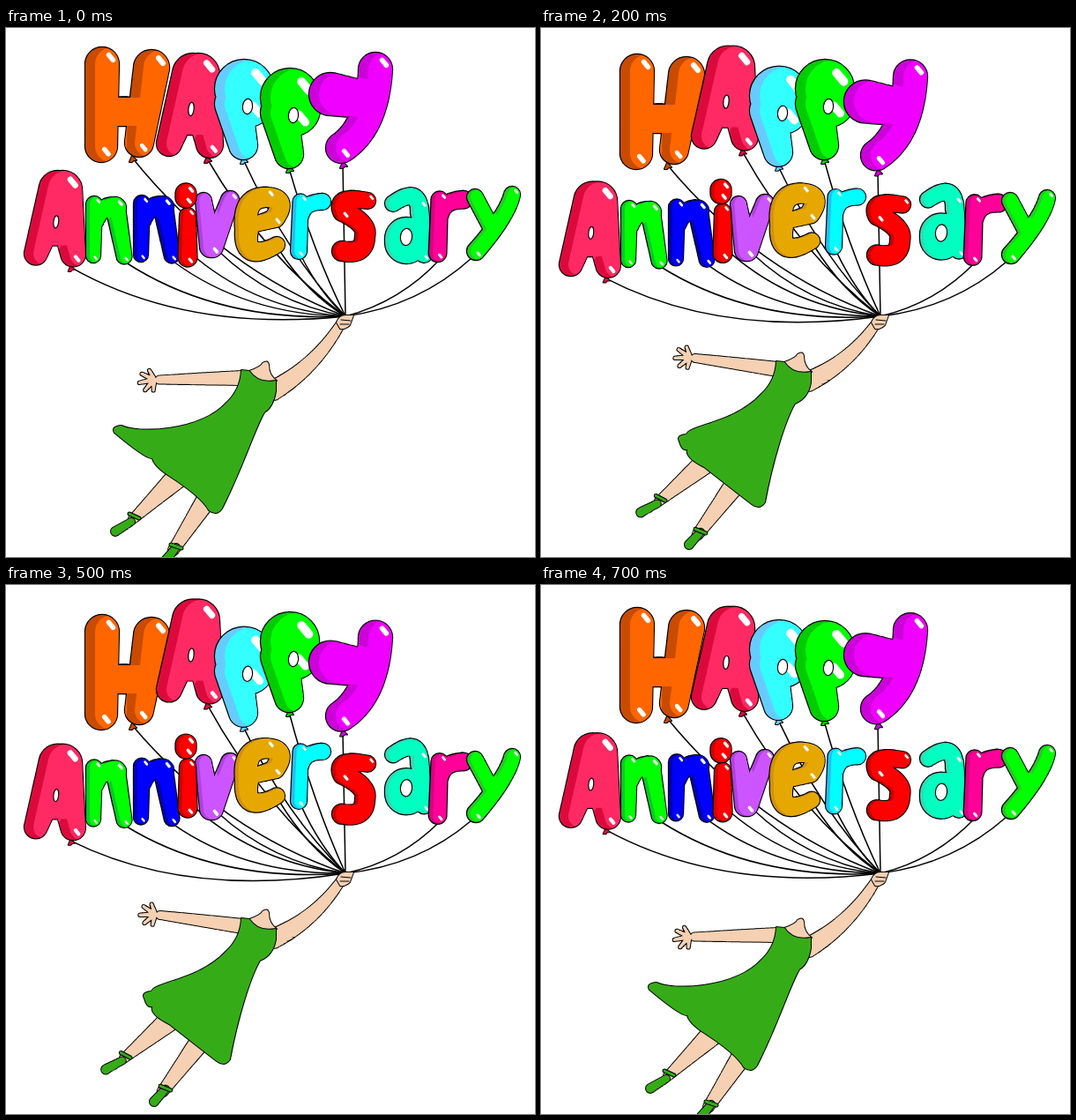
An HTML page with a canvas that plays this animation: 600 by 600 pixels, repeating every 800 ms.

```html
<!DOCTYPE html>
<html lang="en">
<head>
<meta charset="utf-8">
<title>Happy Anniversary</title>
<style>
html, body { margin: 0; width: 100%; height: 100%; overflow: hidden; background: #fff; }
canvas { display: block; width: 100vw; height: 100vh; }
</style>
</head>
<body>
<canvas id="stage" width="600" height="600" role="img" aria-label="Happy Anniversary"></canvas>
<script>
const ctx = document.getElementById('stage').getContext('2d');
const SKIN = '#f5d0b2', GREEN = '#36ab18';
const HAND = { x: 385, y: 327 };

// A limb is a tapering tube: x, y, [bend x, y,] x, y, start radius, end radius.
function tubes(limbs) {
  const path = new Path2D(), steps = 40;
  for (const limb of limbs) {
    const [r0, r1] = limb.slice(-2), [x0, y0] = limb, [x1, y1] = limb.slice(-4);
    const [cx, cy] = limb.length > 6 ? limb.slice(2) : [(x0 + x1) / 2, (y0 + y1) / 2];
    for (let i = 0; i <= steps; i++) {
      const t = i / steps, u = 1 - t, r = r0 + (r1 - r0) * t;
      const x = u * u * x0 + 2 * u * t * cx + t * t * x1;
      const y = u * u * y0 + 2 * u * t * cy + t * t * y1;
      path.moveTo(x + r, y);
      path.arc(x, y, r, 0, 7);
    }
  }
  return path;
}

// Letter skeletons; the first `lit` limbs carry shines, `tail` is where the string hangs.
const glyphs = {
  H: { limbs: [[20, 20, 19, 113, 19, 18], [76, 24, 62, 109, 20, 16], [22, 74, 62, 74, 16, 16]], lit: 2, tail: [54, 126] },
  A: { limbs: [[48, 25, 61, 104, 24, 15], [42, 24, 15, 103, 23, 14], [25, 78, 55, 78, 15, 15]], hole: [40, 64, 2.5, 7], tail: [58, 120] },
  P: { limbs: [[34, 33, 38, 46, 33, 30], [22, 50, 33, 97, 21, 16]], hole: [38, 53, 5, 8], tail: [33, 113] },
  Y: { limbs: [[75, 20, 72, 85, 36, 109, 19, 17], [24, 48, 60, 54, 24, 21]], tail: [38, 127] },
  n: { limbs: [[34, 13, 44, 69, 11, 8.5], [10, 10, 9, 68, 9, 8], [12, 30, 20, 8, 35, 14, 8, 11]], lit: 2, tail: [46, 76] },
  i: { limbs: [[11, 36, 11, 83, 9, 10.5]], tail: [21, 84] },
  dot: { limbs: [[9, 11, 9, 15, 11.5, 11.5]] },
  v: { limbs: [[40, 11, 20, 64, 10, 12], [10, 12, 18, 64, 9, 12]], tail: [26, 68] },
  e: { limbs: [[35, 12, 60, 13, 45, 35, 11, 11], [13, 48, 8, 12, 35, 12, 13, 11], [47, 66, 8, 88, 13, 48, 9, 13], [45, 36, 18, 44, 10, 8]], tail: [50, 72] },
  r: { limbs: [[9, 10, 7, 66, 8.5, 9], [10, 26, 14, 10, 34, 10, 8, 9]], tail: [10, 72] },
  s: { limbs: [[41, 14, 4, 8, 13, 26, 9, 11], [13, 26, 42, 40, 38, 54, 11, 11], [38, 54, 38, 76, 12, 71, 11, 11]] },
  a: { limbs: [[40, 24, 45, 77, 10, 9], [10, 19, 40, -2, 40, 30, 9, 10], [25, 59, 25, 63, 24, 24]], hole: [25, 57, 6, 9] },
  y: { limbs: [[52, 10, 46, 34, 11, 74, 9, 10], [10, 13, 27, 45, 9, 9]], tail: [6, 82] }
};

function letter(name, x, y, step, light, dark, scale = 1) {
  const glyph = glyphs[name];
  return { ...glyph, x, y, step, light, dark, scale, path: tubes(glyph.limbs), big: 'HAPY'.includes(name) };
}

// Name, left, top, rise or fall per step, colours.
const letters = [
  letter('H', 89, 21, 4, '#ff6600', '#c84b00'),
  letter('A', 170, 28, -4.2, '#ff2a63', '#dc0a3c'),
  letter('P', 236, 36, 3.9, '#33ffff', '#66ccff'),
  letter('P', 288, 46, -5, '#00ff00', '#00cc00'),
  letter('Y', 344, 27, 4.2, '#f000ff', '#cc00d9'),
  letter('n', 90, 190, 2.5, '#00ff00', '#00cc22'),
  letter('n', 144, 189, 2.2, '#0000ff', '#0000b8'),
  letter('v', 214, 184, 2, '#cc55ff', '#b040e0'),
  letter('i', 195, 177, -2.3, '#ff0000', '#d00000'),
  letter('dot', 195, 177, -2.3, '#ff0000', '#d00000'),
  letter('e', 260, 180, -2.25, '#e6a800', '#d09010'),
  letter('r', 325, 187, -2.7, '#00ffff', '#22bff0'),
  letter('s', 369, 182, 2.25, '#ff0000', '#c60000'),
  letter('a', 429, 180, -2.25, '#00ffc0', '#2fdcb6'),
  letter('r', 482, 184, 1.9, '#ff0099', '#d80082', 1.08),
  letter('y', 522, 179, 2, '#00ff00', '#22cc22'),
  letter('A', 20, 161, 6.25, '#ff2a63', '#dc0a3c', 0.92)
];

function shape(path, fill, width = 2) {
  ctx.lineWidth = width;
  ctx.strokeStyle = '#000';
  ctx.stroke(path);
  ctx.fillStyle = fill;
  ctx.fill(path);
}

function moved(x, y, turn, scale, paint) {
  ctx.save();
  ctx.translate(x, y);
  ctx.rotate(turn);
  ctx.scale(scale, scale);
  paint();
  ctx.restore();
}

function drawString(l, d) {
  if (!l.tail) return;
  const x = l.x + l.tail[0] * l.scale, y = l.y + l.tail[1] * l.scale + l.step * d;
  const dx = HAND.x - x;
  ctx.beginPath();
  ctx.moveTo(x, y);
  ctx.quadraticCurveTo(x + dx * 0.42, (y + HAND.y) / 2 + Math.abs(dx) * 0.15, HAND.x, HAND.y);
  ctx.lineWidth = 1.5;
  ctx.strokeStyle = '#000';
  ctx.stroke();
}

function shine(x, y, r) {
  ctx.beginPath();
  ctx.moveTo(x, y);
  ctx.lineTo(x + r * 0.25, y + r * 0.3);
  ctx.lineWidth = r * 0.3;
  ctx.strokeStyle = '#fff';
  ctx.stroke();
}

function drawLetter(l) {
  if (l.big) shape(new Path2D(`M${l.tail[0]} ${l.tail[1] - 2}l5 5l-3 0l-2 2l-3 0z`), l.dark);
  shape(l.path, l.dark, 2.4);
  ctx.save();
  ctx.clip(l.path);
  ctx.translate(l.big ? 11 : 4, 0);
  ctx.fillStyle = l.light;
  ctx.fill(l.path);
  ctx.restore();
  for (const limb of l.limbs.slice(0, l.lit || 1)) {
    const [r0, r1] = limb.slice(-2), [x1, y1] = limb.slice(-4);
    shine(limb[0] + r0 * 0.4, limb[1] - r0 * 0.55, r0);
    shine(x1 + r1 * 0.2, y1 + r1 * 0.2, r1);
  }
  if (l.hole) {
    const hole = new Path2D();
    hole.ellipse(...l.hole, 0.1, 0, 7);
    shape(hole, '#fff', 2.4);
  }
}

const neck = new Path2D('M276 389Q290 384 291 380Q297 376 298 382Q298 394 307 400Q288 408 276 389Z');
const fist = new Path2D('M375 334Q378 326 385 326L394 326L390 337Q385 342 379 341Z');
const knuckles = new Path2D('M380 331L391 332M379 336L389 336');
const legs = [tubes([[194, 510, 144, 557, 12, 5]]), tubes([[228, 534, 190, 592, 11, 6]])];
const shoes = [
  tubes([[124, 571, 142, 560, 5, 4]]), tubes([[181, 604, 193, 589, 5, 4]]),
  tubes([[140, 551, 151, 556, 1.5, 1.5]]), tubes([[187, 586, 199, 590, 1.5, 1.5]])
];
const fingers = Array.from({ length: 5 }, (_, i) => {
  const angle = Math.PI + 1.1 - 0.65 * i, reach = 12 + 5 * Math.sin(Math.PI * i / 4);
  return [168, 399, 168 + reach * Math.cos(angle), 399 + reach * Math.sin(angle), 2.6, 1.6];
});
const freeArm = tubes([[266, 397, 215, 398, 174, 399, 8, 4.5], ...fingers]);

// How far the body is lifted and turned, and where the skirt's corners fly.
const poses = [
  { lift: 0, turn: 0, tip: [121, 455], hem: [239, 550] },
  { lift: 0, turn: 0, tip: [152, 475], hem: [245, 552] },
  { lift: -10, turn: 0.062, tip: [155, 465], hem: [248, 543] },
  { lift: -13, turn: 0.1, tip: [151, 457], hem: [242, 539] }
];
const ORDER = [0, 1, 2, 3, 3, 2, 1, 0];

function dress({ lift, tip: [tx, ty], hem: [hx, hy] }) {
  const s = lift / 2;
  return new Path2D(`M267 ${388 + lift}L276 ${389 + lift}Q286 ${404 + lift} 306 ${400 + lift}
    L306 ${412 + lift}Q303 ${430 + lift} ${293 + s} ${436 + lift}
    C${282 + s} ${455 + lift} ${268 + s} ${500 + lift} ${hx + 6} ${hy - 5}
    Q${hx} ${hy + 4} ${hx - 9} ${hy - 3}Q222 ${532 + s} 185 ${508 + lift}
    Q${168 + s} ${497 + lift} 166 ${488 + lift}Q160 ${490 + lift} ${tx + 2} ${ty + 4}
    Q${tx - 2} ${ty - 3} ${tx + 10} ${ty - 4}
    C${tx * 0.6 + 76} ${460 + lift} 220 ${458 + lift} 250 ${425 + lift}
    Q266 ${410 + lift} 267 ${388 + lift}Z`);
}

function drawWoman(pose) {
  const { lift, turn } = pose;
  moved(305, 390 + lift, turn, 1, () => {
    ctx.translate(-305, -390);
    legs.forEach(leg => shape(leg, SKIN));
    shoes.forEach(shoe => shape(shoe, GREEN));
  });
  moved(268, 397 + lift, turn * 2.5, 1, () => {
    ctx.translate(-268, -397);
    shape(freeArm, SKIN);
  });
  shape(tubes([[303, 411 + lift, 350, 385 + lift / 2, 380, 335, 11, 5]]), SKIN);
  moved(0, lift, 0, 1, () => shape(neck, SKIN));
  shape(dress(pose), GREEN);
  shape(fist, SKIN);
  ctx.lineWidth = 1;
  ctx.stroke(knuckles);
}

function draw(now) {
  const k = Math.floor(now / 100) % 8, d = Math.min(k, 8 - k);
  ctx.fillStyle = '#fff';
  ctx.fillRect(0, 0, 600, 600);
  ctx.lineCap = ctx.lineJoin = 'round';
  letters.forEach(l => drawString(l, d));
  letters.forEach(l => moved(l.x, l.y + l.step * d, 0, l.scale, () => drawLetter(l)));
  drawWoman(poses[ORDER[k]]);
}

function loop(now) {
  draw(now);
  requestAnimationFrame(loop);
}
draw(0);
requestAnimationFrame(loop);
</script>
</body>
</html>
```
